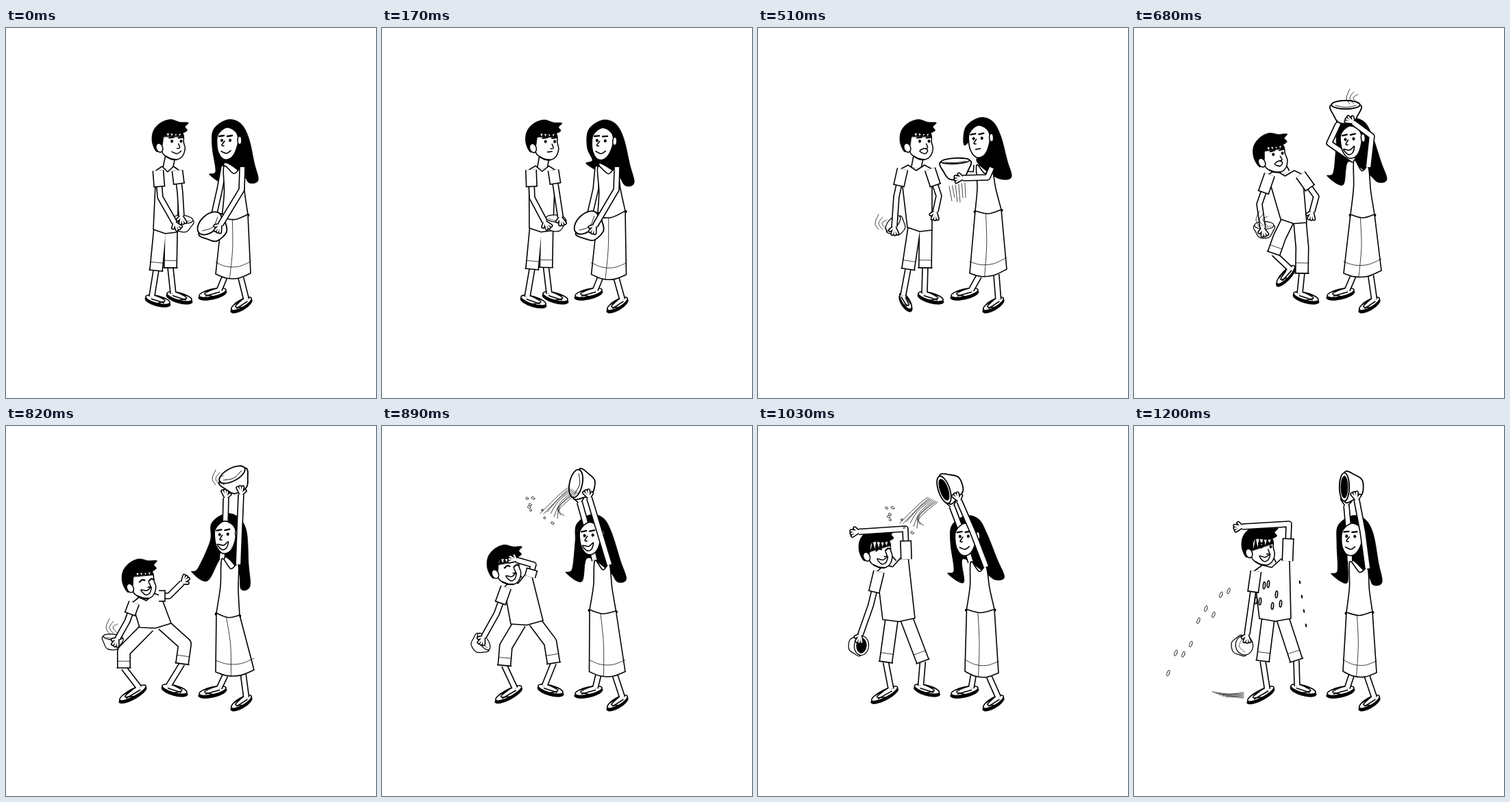
An HTML page that plays this animation: 540 px wide and 540 px high, repeating every 1370 ms.

```html
<!DOCTYPE html>
<html lang="en">
<head>
<meta charset="utf-8">
<title>Water play</title>
<style>
html, body { margin: 0; width: 100%; height: 100%; overflow: hidden; background: #fff; }
svg { display: block; width: 100%; height: 100%; }
path, ellipse { fill: none; stroke: #000; stroke-width: 1.6; stroke-linecap: round; stroke-linejoin: round; }
.thin { stroke-width: .75; }
.bold { stroke-width: 2.3; }
.white { fill: #fff; }
.ink { fill: #000; stroke-width: .8; }
.tube { stroke-linecap: butt; }
.long, .short { visibility: hidden; animation: long 1370ms step-end infinite; }
.short { animation-name: short; }
@keyframes long { 0% { visibility: visible; } 12.40876%, 100% { visibility: hidden; } }
@keyframes short { 0% { visibility: visible; } 5.10949%, 100% { visibility: hidden; } }
</style>
</head>
<body>
<svg id="stage" viewBox="0 0 540 540"></svg>
<script>
const pairs = n => Array.from({ length: n.length >> 1 }, (_, i) => [n[2 * i], n[2 * i + 1]]);
const mix = (a, b, t) => Array.isArray(a) ? a.map((v, i) => mix(v, b[i], t)) : a + (b - a) * t;
const add = ([x, y], dx, dy) => [x + dx, y + dy];
const angle = (a, b) => Math.atan2(b[1] - a[1], b[0] - a[0]);
const polar = (p, turn, r) => add(p, r * Math.cos(turn), r * Math.sin(turn));

// Smooth curve through a few points
function smooth(pts, closed) {
  const n = pts.length;
  const at = i => pts[closed ? (i + n) % n : Math.max(0, Math.min(n - 1, i))];
  let d = 'M' + pts[0];
  for (let i = 0; i < (closed ? n : n - 1); i++) {
    const [a, b, c, e] = [at(i - 1), at(i), at(i + 1), at(i + 2)];
    d += `C${add(b, (c[0] - a[0]) / 6, (c[1] - a[1]) / 6)} ${add(c, (b[0] - e[0]) / 6, (b[1] - e[1]) / 6)} ${c}`;
  }
  return d + (closed ? 'Z' : '');
}

const path = (look, d, style = '') => `<path class="${look}" d="${d}" style="${style}"/>`;
const line = (look, ...n) => path(look, smooth(pairs(n)));
const blob = (look, ...n) => path(look, smooth(pairs(n), true));
const poly = (look, pts) => path(look, 'M' + pts.join('L') + 'Z');
const oval = (look, x, y, rx, ry, turn = 0) =>
  `<ellipse class="${look}" cx="${x}" cy="${y}" rx="${rx}" ry="${ry}" transform="rotate(${turn} ${x} ${y})"/>`;
const place = (x, y, turn, size, drawing) =>
  `<g transform="translate(${x} ${y}) rotate(${turn}) scale(${size})">${drawing}</g>`;

// Outlined limbs that melt into each other
function tubes(...limbs) {
  const layer = (color, inset) => limbs.map(([width, ...pts]) => path(width < 7 ? 'line' : 'tube',
    'M' + pts.join('L'), `stroke:${color};stroke-width:${width - inset}px`)).join('');
  return layer('#000', 0) + layer('#fff', 3.2);
}

function bar(look, from, to, width) {
  const turn = angle(from, to) + Math.PI / 2;
  return path(look, `M${polar(to, turn, width / 2)}L${polar(to, turn, -width / 2)}`);
}

function arm(shoulder, elbow, wrist) {
  const turn = angle(elbow, wrist);
  const fingers = [-.5, -.15, .2, .8].map((spread, i) => [5.6, wrist, polar(wrist, turn + spread, i < 3 ? 11 : 8)]);
  return tubes([9.5, shoulder, elbow, wrist], ...fingers);
}

function foot(shin, heel, toe) {
  const [x, y] = mix(heel, toe, .5), turn = angle(heel, toe) * 180 / Math.PI;
  const half = Math.hypot(toe[0] - heel[0], toe[1] - heel[1]) / 2;
  const ankle = add(mix(heel, toe, .25), 0, -3), ball = mix(heel, toe, .8);
  return oval('ink', x, y + 2, half + 1, 6.5, turn) + oval('white', x, y - 1, half, 5.5, turn)
    + tubes([9.5, shin, ankle], [8, ankle, add(ball, 0, -2)])
    + path('line', smooth([add(mix(heel, toe, .45), 0, 5), add(ball, 0, -2), add(mix(heel, toe, .5), 0, -6)]));
}

function bowl([x, y, turn, open], size) {
  const rim = 18 * open;
  return place(x, y, turn, size, blob('white', -18, 0, -15, 14, -8, 23, 8, 23, 15, 14, 18, 0)
    + oval('white', 0, 0, 18, rim) + (Math.abs(turn) > 85 ? oval('ink', 0, 0, 14, rim * .7) : line('thin', -13, 1, 0, rim * .6, 13, 1)));
}

const mouths = {
  smile: line('line', -2, 10, 6, 13, 12, 9),
  flat: line('line', 1, 10, 8, 9),
  gasp: blob('white', -2, 9, 5, 5, 10, 8, 6, 13),
  grin: blob('white', -5, 8, 4, 10, 11, 5, 8, 14, 1, 16),
};

function boyHead([x, y, tilt, wet], mood) {
  const fringe = Array.from({ length: 13 }, (_, i) => [-20 + 3 * i, i % 2 ? -19 : -13 + wet * (14 - i)]);
  const eyes = [-2, 12].map(ex => mood === 'grin' && wet < .8
    ? line('bold', ex - 4, -4, ex, -7, ex + 4, -6)
    : oval('ink', ex, -6, 1.6, 2.2) + line('bold', ex - 4, -11, ex + 3, -12)).join('');
  return place(x, y, tilt, .96,
    blob('white', -14, -18, 13, -19, 16, -4, 18, 6, 13, 18, 3, 22, -9, 18, -17, 9)
    + blob('ink', -25, 10, -32, -5, -30, -22, -19, -34, -4, -39, 10, -35, 23, -34, 18, -28, 21, -22, 8, -17, -12, -17, -17, 1)
    + poly('ink', fringe) + oval('white', -21, 4, 5, 7, -20) + line('line', 8, -2, 10, 4, 6, 5)
    + eyes + mouths[mood] + line('bold', -11, 17, -3, 21, 5, 22));
}

function girlHead([x, y, tilt], mood) {
  const eyes = [-8, 4].map(ex => oval('ink', ex, -6, 1.6, 2) + line('bold', ex - 4, -12, ex + 3, -13)).join('');
  return place(x, y, tilt, 1,
    blob('white', -14, -14, -1, -25, 12, -19, 16, -7, 12, 10, 5, 20, -4, 22, -11, 16, -15, 4)
    + oval('white', 18, -6, 3, 6) + line('line', -4, -5, -8, 1, -5, 2) + eyes
    + `<g transform="translate(-7 0)">${mouths[mood]}</g>`);
}

function boy({ mood, joints: [head, trunk, arms, cuffs, feet, cup] }) {
  const [sL, sR, hL, hR] = pairs(trunk), [eL, wL, eR, wR] = pairs(arms);
  const [cL, cR] = pairs(cuffs), bow = cuffs[4], [heelL, toeL, heelR] = pairs(feet);
  const hips = [mix(hL, hR, .28), mix(hL, hR, .74)];
  const knees = [add(mix(hips[0], cL, .5), -bow, bow / 3), add(mix(hips[1], cR, .5), bow, 0)];
  const sleeves = [mix(sL, eL, .6), mix(sR, eR, .6)];
  const neck = add(mix(sL, sR, .5), 0, -6), chin = mix(neck, head, .5);
  return foot(cL, heelL, toeL) + foot(cR, heelR, add(heelR, 36, 10))
    + tubes([20, hips[0], knees[0], cL], [20, hips[1], knees[1], cR])
    + bar('line', knees[0], cL, 20) + bar('line', knees[1], cR, 20)
    + bar('thin', knees[0], mix(knees[0], cL, .6), 18) + bar('thin', knees[1], mix(knees[1], cR, .6), 18)
    + tubes([16, chin, add(neck, 0, 4)])
    + poly('white', [add(mix(sL, sR, .2), 0, -6), add(sL, -3, 0), hL, add(mix(hL, hR, .5), 0, 4), hR, add(sR, 3, 0), add(mix(sL, sR, .8), 0, -6), add(neck, 0, 8)])
    + boyHead(head, mood) + bowl(cup, .78)
    + arm(sL, eL, wL) + arm(sR, eR, wR)
    + tubes([17, sL, sleeves[0]]) + tubes([17, sR, sleeves[1]])
    + bar('line', sL, sleeves[0], 16) + bar('line', sR, sleeves[1], 16);
}

function girl({ mood, joints: [head, trunk, arms, skirt, hair, pot] }) {
  const [sL, sR, hL, hR] = pairs(trunk), [eL, wL, eR, wR] = pairs(arms);
  const [bL, bR] = pairs(skirt), [tipL, tipR] = pairs(hair);
  const hem = t => add(mix(bL, bR, t), 0, 30 * t * (1 - t)), neck = add(mix(sL, sR, .45), 0, -3);
  const around = [[-22, 4], [-20, -22], [0, -36], [19, -31], [31, -10]].map(([x, y]) => add(head, x, y));
  const hemCurve = lift => smooth([0, .3, .65, 1].map(t => add(hem(t), 0, -lift)));
  return path('ink', smooth([tipL, add(tipL, 9, -5), ...around, mix(around[4], tipR, .6), tipR, add(tipR, -13, 4), add(sR, 0, 10), add(head, -4, 27), add(tipL, 23, 13)], true))
    + foot(hem(.25), [321, 383], [282, 392]) + foot(hem(.72), [358, 395], [329, 412])
    + path('white', `M${hR}L${hL}L${bL}${hemCurve(0).slice(1).replace(/^[^C]*/, '')}Z`)
    + path('thin', hemCurve(17)) + path('thin', smooth([mix(hL, hR, .4), mix(hL, hem(.4), .5).map((v, i) => i ? v : v + 10), hem(.4)]))
    + arm(sL, eL, wL) + tubes([12, mix(head, neck, .5), add(neck, 0, 4)])
    + path('white', smooth([sL, add(mix(sL, hL, .5), 2, 0), hL, hL, add(mix(hL, hR, .5), 0, 5), hR, hR, add(mix(sR, hR, .5), -1, 0), sR, add(mix(sL, sR, .55), 0, 10)], true))
    + girlHead(head, mood) + bowl(pot, 1.15) + arm(sR, eR, wR);
}

const pose = (mood, ...joints) => ({ mood, joints });
const between = (a, b) => pose(b.mood, ...mix(a.joints, b.joints, .5));

// Boy: head x y tilt wetness, shoulders and shirt hem, elbows and wrists, cuffs and knee bow, left foot and right heel, bowl
const boys = {
  calm: pose('smile', [244, 171, 0, 0], [222, 208, 250, 208, 215, 294, 250, 298], [225, 247, 246, 284, 254, 240, 256, 274],
    [219, 354, 240, 350, 0], [204, 393, 239, 402, 235, 388], [259, 279, 8, .4]),
  worried: pose('flat', [237, 172, 0, 0], [213, 206, 250, 207, 215, 290, 249, 293], [213, 248, 229, 281, 256, 240, 265, 278],
    [219, 350, 239, 349, 0], [202, 393, 239, 406, 235, 388], [248, 277, 0, .33]),
  surprised: pose('gasp', [238, 171, 0, 0], [211, 206, 251, 206, 218, 291, 254, 295], [202, 246, 199, 290, 264, 245, 259, 268],
    [219, 352, 244, 350, 0], [208, 388, 223, 411, 234, 388], [197, 285, -48, .5]),
  dodging: pose('gasp', [206, 190, -8, 0], [198, 214, 243, 214, 214, 279, 252, 284], [183, 257, 188, 292, 266, 246, 260, 268],
    [204, 329, 245, 358, 2], [234, 348, 209, 374, 233, 388], [190, 288, 0, .4]),
  crouching: pose('grin', [201, 231, -5, 0], [187, 258, 223, 248, 195, 294, 241, 288], [177, 285, 163, 310, 238, 248, 257, 229],
    [172, 353, 257, 347, 18], [204, 380, 166, 401, 228, 380], [156, 308, 5, .3]),
  splashed: pose('grin', [169, 190, -5, .5], [175, 213, 209, 192, 181, 284, 229, 280], [158, 262, 134, 305, 204, 157, 136, 162],
    [185, 346, 244, 345, 0], [203, 382, 166, 401, 228, 380], [141, 321, 108, .6]),
  soaked: pose('grin', [188, 182, 0, 1], [178, 212, 224, 197, 183, 281, 229, 281], [171, 262, 165, 304, 226, 143, 158, 147],
    [188, 343, 237, 342, 0], [204, 382, 166, 402, 229, 380], [161, 320, 80, .9]),
};

// Girl: head x y tilt, shoulders and hips, elbows and wrists, skirt hem, hair tips, pot
const girls = {
  friendly: pose('smile', [323, 170, 0], [318, 202, 345, 203, 315, 277, 353, 272], [312, 235, 303, 275, 344, 236, 313, 287],
    [306, 359, 357, 358], [297, 214, 368, 222], [297, 285, -42, .6]),
  shy: pose('smile', [320, 171, 5], [312, 203, 341, 203, 314, 275, 357, 262], [312, 235, 303, 272, 340, 236, 309, 290],
    [305, 360, 356, 362], [299, 182, 368, 230], [299, 283, -45, .6]),
  lifting: pose('flat', [323, 167, -3], [319, 200, 341, 204, 317, 267, 355, 265], [318, 214, 300, 213, 335, 218, 299, 219],
    [309, 358, 363, 352], [306, 162, 370, 217], [288, 194, -3, .2]),
  raising: pose('grin', [317, 168, -5], [321, 193, 342, 203, 316, 272, 351, 272], [285, 168, 298, 140, 347, 158, 320, 138],
    [306, 358, 361, 354], [282, 216, 369, 221], [309, 112, 0, .3]),
  pouring: pose('grin', [320, 164, -3], [315, 194, 339, 202, 307, 273, 341, 276], [320, 150, 321, 105, 341, 150, 343, 100],
    [306, 359, 362, 356], [271, 213, 356, 234], [330, 71, -28, .45]),
  splashing: pose('grin', [288, 167, -5], [306, 199, 325, 203, 299, 263, 342, 264], [280, 155, 256, 118, 292, 152, 262, 110],
    [299, 358, 348, 361], [266, 215, 357, 213], [236, 97, -128, .45]),
  resting: pose('smile', [318, 167, 2], [315, 198, 341, 208, 310, 272, 348, 271], [313, 150, 310, 116, 334, 155, 325, 108],
    [305, 358, 354, 360], [288, 216, 362, 228], [307, 89, -90, .35]),
};

const random = i => Math.abs(Math.sin(i * 127.1 + 3) * 4375.85) % 1;
const repeat = (count, draw) => Array.from({ length: count }, (_, i) => draw(i)).join('');

// Curls of water leaping from a bowl
const spill = (x, y) => repeat(3, i => line('thin', x + 6 * i, y - 2, x + 5 * i - 5, y - 11, x + 6 * i, y - 24 + 4 * i));
const speedLines = repeat(6, i => line('thin', 279 + 4.6 * i, 231 - i, 283 + 4 * i, 246 + 12 * random(i)));
const trickle = repeat(5, i => line('thin', 143 + 2 * i, 336, 147 + 2 * i, 358, 148 + 4 * i, 370 + 14 * random(i)));

function gush([x, y]) {
  return repeat(8, i => line('thin', x + 2 * i - 4, y + i, x - 15 - 4 * random(i), y + 10 + 3 * i, x - 45 + 5 * i, y + 34 + 12 * random(i + 9)))
    + repeat(8, i => oval('thin', x - 20 - 58 * random(i + 20), y + 10 + 42 * random(i + 40), 1 + 2 * random(i), 1.6, 30));
}

const drops = repeat(7, i => oval('line', 178 + 6 * i, 226 + 44 * random(i + 2), 1.6, 5, 5))
  + repeat(9, i => oval('thin', 50 + 11 * i, 360 - 16 * i + 34 * (random(i) - .5), 1.8, 4.5, 20))
  + repeat(4, i => oval('ink', 242 + 3 * i, 228 + 21 * i, .7, 2.5, -10))
  + repeat(5, i => line('thin', 114 + 5 * i, 388 + 2 * i, 138, 391 + i, 160, 389 + 2 * i));

const scenes = [
  [170, boys.calm, girls.friendly],
  [170, between(boys.calm, boys.worried), between(girls.friendly, girls.shy)],
  [170, boys.worried, girls.shy],
  [170, boys.surprised, girls.lifting, spill(176, 296) + speedLines],
  [70, boys.dodging, girls.raising, spill(183, 291) + spill(315, 113)],
  [70, between(boys.dodging, boys.crouching), between(girls.raising, girls.pouring), spill(167, 299)],
  [70, boys.crouching, girls.pouring, spill(151, 305) + spill(306, 88)],
  [70, between(boys.crouching, boys.splashed), between(girls.pouring, girls.splashing), gush([276, 90])],
  [70, boys.splashed, girls.splashing, gush([238, 103]) + trickle],
  [170, between(boys.splashed, boys.soaked), between(girls.splashing, girls.resting), gush([252, 104])],
  [170, boys.soaked, girls.resting, drops],
];

const loop = 1370;
let start = 0;
document.getElementById('stage').innerHTML = scenes.map(([time, him, her, water = '']) => {
  const group = `<g class="${time > 100 ? 'long' : 'short'}" style="animation-delay:${start - loop}ms">${boy(him)}${girl(her)}${water}</g>`;
  start += time;
  return group;
}).join('');
</script>
</body>
</html>
```
